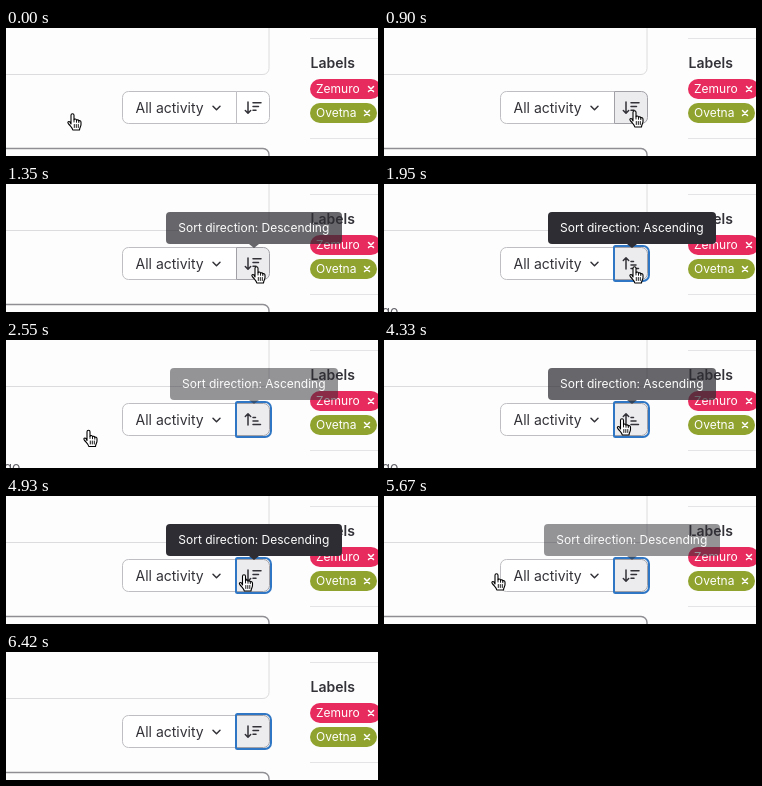
An HTML page for the animation above (7.02 s loop, 372x128 px).

```html
<!DOCTYPE html>
<html lang="en">
<head>
<meta charset="utf-8">
<title>Sort direction toggle</title>
<style>
  html, body { margin: 0; width: 100%; height: 100%; overflow: hidden; background: #fdfdfd; }
  svg { display: block; width: 372px; height: 128px; }
  text { font: 14px Inter, "Open Sans", sans-serif; fill: #333238; }
  .small { font-size: 12px; fill: #fff; }
  .line { fill: none; stroke: #dcdcde; }
  .icon { fill: none; stroke: #333238; stroke-width: 1.5; stroke-linecap: round; stroke-linejoin: round; }
  .cross { stroke: #fff; stroke-width: 1.5; stroke-linecap: round; }
</style>
</head>
<body>
<svg viewBox="0 0 372 128">
  <path class="line" d="M0 46.5H257a6 6 0 0 0 6-6V0"/>
  <path class="line" style="stroke:#e4e4e7" d="M304 10.5H372M304 110.5H372"/>
  <path id="editor" class="line" style="stroke:#8f8e93;stroke-width:1.4" d="M0 120.5H257a6 6 0 0 1 6 6V128"/>
  <text id="age" x="14.5" y="132.3" text-anchor="end" style="fill:#626168">ago</text>

  <text x="304.5" y="40" style="font-weight:600">Labels</text>
  <rect x="304" y="51" width="71" height="20" rx="10" fill="#e82b5e"/>
  <text class="small" x="310" y="65.3">Zemuro</text>
  <path class="cross" d="M362.5 58.5l5 5m0-5l-5 5"/>
  <rect x="304" y="75" width="67" height="20" rx="10" fill="#8fa32e"/>
  <text class="small" x="310" y="89.3">Ovetna</text>
  <path class="cross" d="M358.5 82.5l5 5m0-5l-5 5"/>

  <path id="filter" d="M230.5 63.5H122.500a6 6 0 0 0-6 6V89.500a6 6 0 0 0 6 6H230.500z"/>
  <path id="sort" d="M230.5 63.5H257.500a6 6 0 0 1 6 6V89.500a6 6 0 0 1-6 6H230.500z"/>
  <path id="ring" fill="none" stroke="#2f76c4" stroke-width="2" d="M231.500 62H259a6 6 0 0 1 6 6V91a6 6 0 0 1-6 6H231.500a1.500 1.500 0 0 1-1.500-1.500V63.500a1.500 1.500 0 0 1 1.500-1.500z"/>
  <text x="129.500" y="84.500">All activity</text>
  <path class="icon" d="M207 78.300l3.500 3.500 3.500-3.500"/>
  <path id="down" class="icon" d="M242 74V85M239.300 82.500l2.700 2.700 2.700-2.700M247 74.800H255M247 78.500H252.500M247 82.200H250"/>
  <path id="up" class="icon" d="M242 85V74M239.300 76.500l2.700-2.700 2.700 2.700M247 77.500H249.500M247 81H252M247 84.500H254.500"/>

  <g id="tip">
    <rect id="tipBox" y="28" height="32" rx="4" fill="#2e2d33"/>
    <path d="M243 60h10l-5 4z" fill="#2e2d33"/>
    <text id="tipText" class="small" x="247.800" y="48.300" text-anchor="middle"></text>
  </g>

  <g id="hand" stroke="#000" stroke-width="1.100" stroke-linejoin="round" stroke-linecap="round">
    <path fill="#fff" d="M4 11V2.300C4 .3 7 .3 7 2.300V6.800C7.300 5.600 9.400 5.800 9.500 7.200 10 6.400 11.700 6.800 11.800 8 12.400 7.300 14 7.800 14 9.200V11.500C14 13.500 12.600 14.500 12.500 17H5.800C5.500 14.800 3.200 13.200 1.200 10.400.2 8.900 1.800 7.800 3 9z"/>
    <path fill="none" stroke-width=".9" d="M7 7V9M9.500 7.500V9.300M11.800 8.300V9.700M7.300 11.500V14.500M9.300 11.500V14.500M11.300 11.500V14.500"/>
  </g>
</svg>
<script>
const LOOP = 7020;
const $ = id => document.getElementById(id);
const set = (id, name, value) => $(id).setAttribute(name, value);
const show = (id, on) => set(id, "visibility", on ? "visible" : "hidden");

// Each step changes part of the state and holds until the next one.
const steps = [
  [0, { hand: [61, 85], tip: 0, asc: false, focus: false, hover: "" }],
  [300, { hand: [90, 75] }],
  [450, { hand: [246, 59] }],
  [600, { hand: [264, 59] }],
  [750, { hand: [263, 63] }],
  [900, { hand: [245, 82], hover: "sort" }],
  [1350, { tip: .72 }],
  [1500, { tip: 1 }],
  [1800, { focus: true }],
  [1950, { asc: true }],
  [2550, { hand: [77, 89.5], tip: .5, hover: "" }],
  [2700, { hand: [27, 90], tip: 0 }],
  [3450, { hand: [132, 85] }],
  [3600, { hand: [202.5, 78], hover: "filter" }],
  [3740, { hand: [228.5, 78] }],
  [3880, { hand: [229.5, 78], hover: "sort" }],
  [4030, { hand: [232.5, 78] }],
  [4330, { tip: .72 }],
  [4480, { tip: 1 }],
  [4930, { asc: false }],
  [5670, { hand: [107, 77], tip: .5, hover: "" }],
  [5820, { hand: [50.5, 74], tip: 0 }],
  [6420, { hand: null }]
];

function stateAt(time) {
  return Object.assign({}, ...steps.filter(([start]) => start <= time).map(([, change]) => change));
}

function paintButton(id, active) {
  set(id, "fill", active ? "#ececef" : "#fff");
  set(id, "stroke", active ? "#a0a0a6" : "#bfbfc3");
}

function draw(time) {
  const { hand, tip, asc, focus, hover } = stateAt(time);
  show("editor", !asc);
  show("age", asc);
  show("up", asc);
  show("down", !asc);
  show("ring", focus);
  paintButton("filter", hover === "filter");
  paintButton("sort", focus || hover === "sort");

  const width = asc ? 168 : 176;
  set("tip", "opacity", tip);
  set("tipBox", "x", 248 - width / 2);
  set("tipBox", "width", width);
  $("tipText").textContent = "Sort direction: " + (asc ? "Ascending" : "Descending");

  show("hand", hand);
  if (hand) set("hand", "transform", `translate(${hand})`);
}

function tick() {
  draw(performance.now() % LOOP);
  requestAnimationFrame(tick);
}
tick();
</script>
</body>
</html>
```
